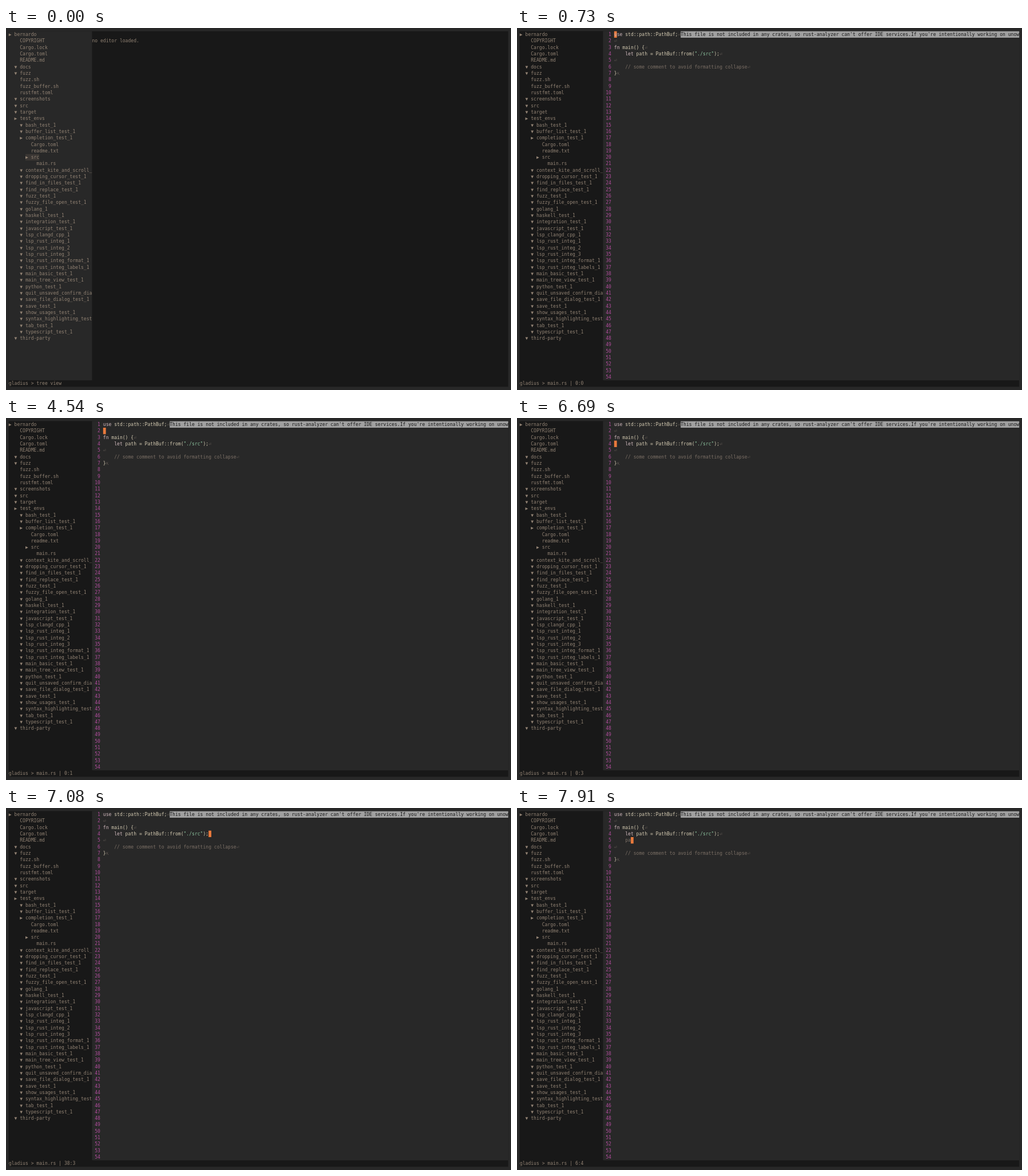
Animation, 883 px wide and 634 px high, one loop 8 s. Source, as an HTML page with a canvas:

```html
<!DOCTYPE html>
<html lang="en">
<head>
<meta charset="utf-8">
<title>Editor session</title>
<style>
  html, body { margin: 0; width: 100%; height: 100%; overflow: hidden; background: #282828; }
  canvas { display: block; width: 883px; height: 634px; }
</style>
</head>
<body>
<canvas id="stage" width="883" height="634"></canvas>
<script>
const ctx = document.getElementById('stage').getContext('2d');
const LOOP = 8000;
const COLS = 180, ROWS = 55, SIDE = 30, CODE = 34;
const CW = 883 / (COLS + 2), RH = 634 / (ROWS + 1);
const FONT_SCALE = 0.1;
const FONT = `${CW / 0.602 / FONT_SCALE}px "DejaVu Sans Mono", monospace`;

const C = {
  lit: '#282828', dark: '#181818', select: '#3a3633', tree: '#928374',
  number: '#b04c9c', text: '#d5cbb2', keyword: '#d4bcc0', string: '#8ec5a0',
  faint: '#7c7066', mark: '#6b625a', cursor: '#e8793c', label: '#a0a0a0'
};

const TREE = `▶ bernardo
    COPYRIGHT
    Cargo.lock
    Cargo.toml
    README.md
  ▼ docs
  ▼ fuzz
    fuzz.sh
    fuzz_buffer.sh
    rustfmt.toml
  ▼ screenshots
  ▼ src
  ▼ target
  ▶ test_envs
    ▼ bash_test_1
    ▼ buffer_list_test_1
    ▶ completion_test_1
        Cargo.toml
        readme.txt
      ▶ src
          main.rs
    ▼ context_kite_and_scroll_
    ▼ dropping_cursor_test_1
    ▼ find_in_files_test_1
    ▼ find_replace_test_1
    ▼ fuzz_test_1
    ▼ fuzzy_file_open_test_1
    ▼ golang_1
    ▼ haskell_test_1
    ▼ integration_test_1
    ▼ javascript_test_1
    ▼ lsp_clangd_cpp_1
    ▼ lsp_rust_integ_1
    ▼ lsp_rust_integ_2
    ▼ lsp_rust_integ_3
    ▼ lsp_rust_integ_format_1
    ▼ lsp_rust_integ_labels_1
    ▼ main_basic_test_1
    ▼ main_tree_view_test_1
    ▼ python_test_1
    ▼ quit_unsaved_confirm_dia
    ▼ save_file_dialog_test_1
    ▼ save_test_1
    ▼ show_usages_test_1
    ▼ syntax_highlighting_test
    ▼ tab_test_1
    ▼ typescript_test_1
  ▼ third-party`.split('\n');

const WARNING = "This file is not included in any crates, so rust-analyzer can't offer " +
  "IDE services.If you're intentionally working on unow";

// Each line is a list of [text, colour] runs.
const EOL = ['⏎', C.mark];
const SOURCE = [
  [['use', C.keyword], [' std::path::PathBuf;', C.text], EOL],
  [EOL],
  [['fn', C.keyword], [' main() {', C.text], EOL],
  [['    let', C.keyword], [' path = PathBuf::from(', C.text], ['"./src"', C.string], [');', C.text], EOL],
  [EOL],
  [['    // some comment to avoid formatting collapse', C.faint], EOL],
  [['}', C.text], ['⇱', C.mark]]
];

// tree: selected row and column span; cursor: column and line; typed: text of the inserted line
const STEPS = [
  { at: 0, tree: [19, 6, 5] },
  { at: 200, tree: [20, 8, 9] },
  { at: 730, cursor: [0, 0] },
  { at: 4540, cursor: [0, 1] },
  { at: 6480, cursor: [0, 2] },
  { at: 6690, cursor: [0, 3] },
  { at: 7080, cursor: [38, 3] },
  { at: 7450, cursor: [4, 4], typed: '    ' },
  { at: 7840, cursor: [5, 4], typed: '    p' },
  { at: 7910, cursor: [6, 4], typed: '    pa' }
];

const colX = col => (col + 1) * CW;
const rowY = row => (row + 0.5) * RH;

function box(col, row, w, h, color) {
  ctx.fillStyle = color;
  ctx.fillRect(colX(col), rowY(row), w * CW, h * RH);
}

// The font is set large and scaled down so advances keep their fractions.
function write(col, row, text, color) {
  ctx.save();
  ctx.translate(colX(col), rowY(row) + 8.4);
  ctx.scale(FONT_SCALE, FONT_SCALE);
  ctx.font = FONT;
  ctx.fillStyle = color;
  ctx.fillText(text, 0, 0);
  ctx.restore();
}

function drawTree(selected) {
  box(0, 0, SIDE, ROWS - 1, selected ? C.lit : C.dark);
  if (selected) box(selected[1], selected[0], selected[2], 1, C.select);
  TREE.forEach((line, row) => {
    const name = line.trimStart();
    write(line.length - name.length, row, name, C.tree);
  });
}

function drawEditor({ cursor, typed }) {
  box(SIDE, 0, COLS - SIDE, ROWS - 1, C.lit);
  for (let n = 1; n < ROWS; n++) write(n < 10 ? 32 : 31, n - 1, String(n), C.number);

  const lines = SOURCE.slice();
  if (typed !== undefined) lines.splice(4, 0, [[typed, C.faint], EOL]);

  box(CODE + 24, 0, WARNING.length, 1, C.label);
  write(CODE + 24, 0, WARNING, C.dark);
  box(CODE + cursor[0], cursor[1], 1, 1, C.cursor);
  lines.forEach((runs, row) => {
    let col = CODE;
    for (const [text, color] of runs) {
      const underCursor = text === '⏎' && row === cursor[1] && col === CODE + cursor[0];
      if (!underCursor) write(col, row, text, color);
      col += text.length;
    }
  });
}

function draw(step) {
  ctx.fillStyle = C.lit;
  ctx.fillRect(0, 0, 883, 634);
  box(0, 0, COLS, ROWS, C.dark);
  drawTree(step.tree);
  if (step.cursor) drawEditor(step);
  else write(SIDE, 1, 'no editor loaded.', C.tree);
  const place = step.cursor ? `main.rs | ${step.cursor.join(':')}` : 'tree view';
  write(0, ROWS - 1, `gladius > ${place}`, C.tree);
}

function tick() {
  const t = performance.now() % LOOP;
  draw(STEPS.findLast(step => step.at <= t));
  requestAnimationFrame(tick);
}
tick();
</script>
</body>
</html>
```
